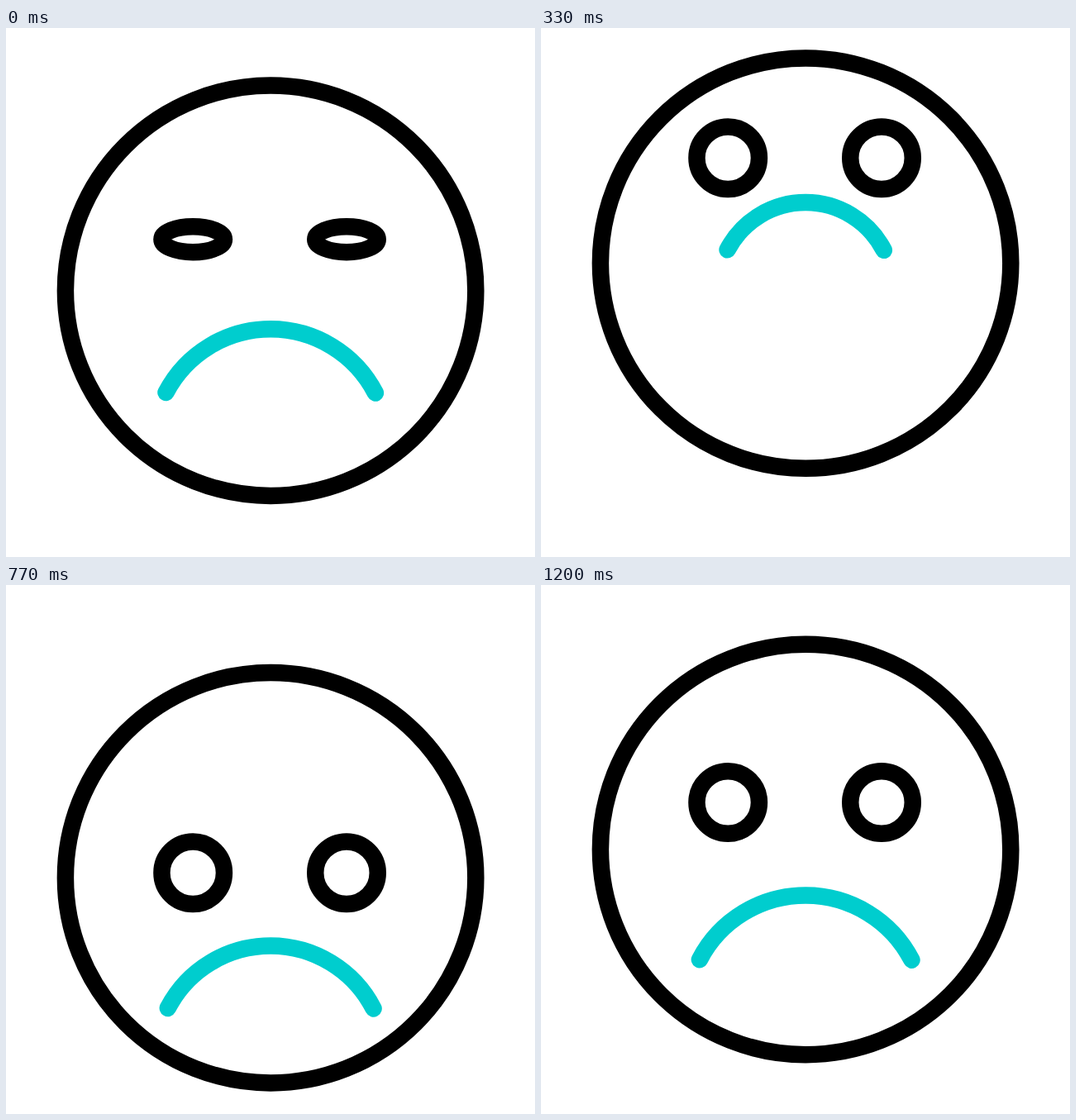
Write an HTML page that moves like this. It is 640 by 640 pixels and loops after 1.67 s.

```html
<!DOCTYPE html>
<html lang="en">
<head>
<meta charset="utf-8">
<title>Sad face</title>
<style>
  html, body { margin: 0; width: 100%; height: 100%; overflow: hidden; background: #fff; }
  svg { display: block; width: 100vw; height: 100vh; }
  svg * { fill: none; stroke: #000; stroke-width: 20.5; }
  #mouth { stroke: #00cdce; stroke-linecap: round; }
</style>
</head>
<body>
<svg viewBox="0 0 640 640">
  <circle id="face" cx="320.1" cy="320" r="248.2"/>
  <ellipse class="eye" cx="226.2" cy="263" rx="37.75" ry="37.75"/>
  <ellipse class="eye" cx="412" cy="263" rx="37.75" ry="37.75"/>
  <path id="mouth"/>
</svg>
<script>
  const LOOP = 1670;
  // ticks at which the look up, the look down and the return begin
  const UP = -0.68, DOWN = 11.52, BACK = 24.1;

  const face = document.getElementById('face');
  const mouth = document.getElementById('mouth');
  const eyes = document.querySelectorAll('.eye');

  // 0 to 1, linear over span ticks
  const ramp = (tick, from, span) => Math.min(1, Math.max(0, (tick - from) / span));

  // rest -> -rise -> +drop -> rest, each move lasting span ticks
  const nod = (tick, rise, drop, span) =>
    -rise * ramp(tick, UP, span)
    + (rise + drop) * ramp(tick, DOWN, span)
    - drop * ramp(tick, BACK, span);

  function mouthPath(y, s) {
    const w = 128.3 * s, h = 38.95 * s, r = 144.6 * s;
    return `M${320.2 - w} ${y + h}A${r} ${r} 0 0 1 ${320.2 + w} ${y + h + 0.5}`;
  }

  function draw(ms) {
    // 30 ticks per second, on a 10 ms clock
    const tick = Math.floor((Math.floor(ms / 10) + 0.5) * 0.3);
    const shrink = ramp(tick, -0.5, 11) - ramp(tick, 15, 9);
    const eyeOpen = 15.5 + 22.25 * ramp(tick, 0, 3);

    face.setAttribute('cy', 320 + nod(tick, 35.4, 34.2, 10.5));
    eyes.forEach(eye => {
      eye.setAttribute('cy', 263 + nod(tick, 105.8, 85.3, 9.8));
      eye.setAttribute('ry', eyeOpen);
    });
    mouth.setAttribute('d', mouthPath(414.2 + nod(tick, 174.6, 59.9, 10.2), 1 - 0.275 * shrink));
  }

  const start = performance.now();
  function loop() {
    draw((performance.now() - start) % LOOP);
    requestAnimationFrame(loop);
  }
  loop();
</script>
</body>
</html>
```
